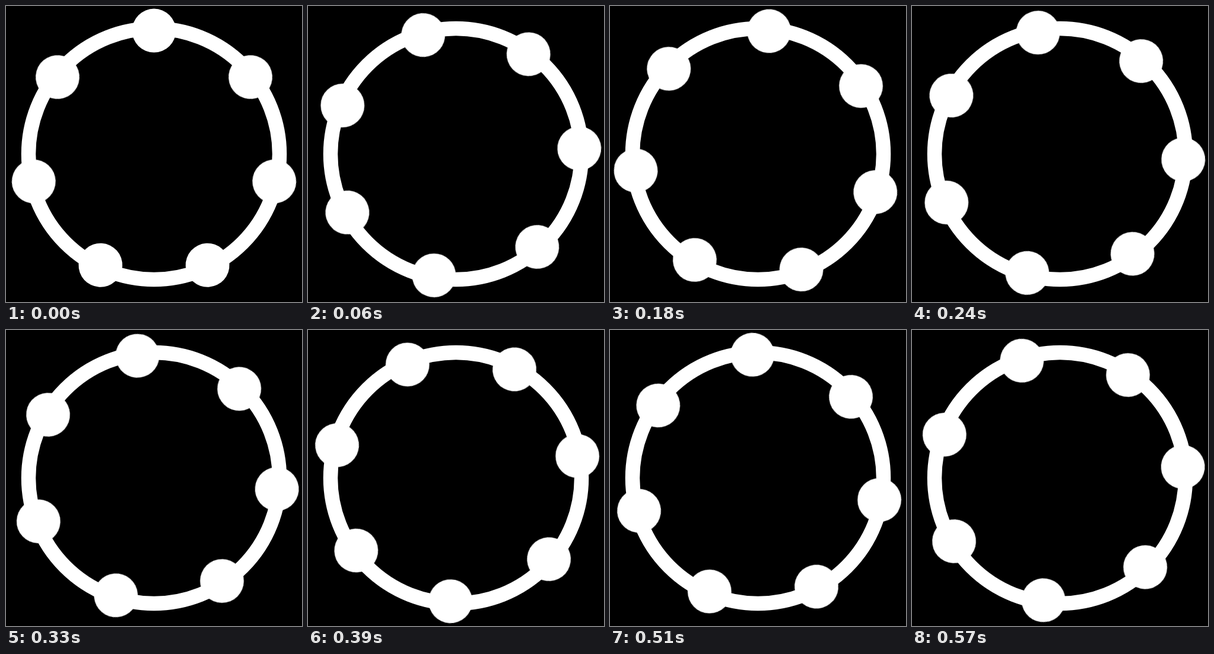
Recreate the animation shown at these times as an HTML page. Size 500 px wide and 500 px high, loop 0.6 s.

```html
<!DOCTYPE html>
<html lang="en">
<head>
<meta charset="utf-8">
<title>Spinning beaded ring</title>
<style>
  html, body { margin: 0; width: 100%; height: 100%; overflow: hidden; background: #000; }
  svg { display: block; width: 100vw; height: 100vh; }
  .ring { fill: none; stroke: #fff; stroke-width: 24.5; }
  .beads { fill: #fff; animation: spin 600ms steps(20, end) infinite; }
  @keyframes spin { to { transform: rotate(360deg); } }
</style>
</head>
<body>
<svg viewBox="-250 -250 500 500">
  <defs><circle id="bead" cy="-208.4" r="37"/></defs>
  <circle class="ring" r="212"/>
  <g class="beads">
    <use href="#bead"/>
    <use href="#bead" transform="rotate(51.4286)"/>
    <use href="#bead" transform="rotate(102.8571)"/>
    <use href="#bead" transform="rotate(154.2857)"/>
    <use href="#bead" transform="rotate(205.7143)"/>
    <use href="#bead" transform="rotate(257.1429)"/>
    <use href="#bead" transform="rotate(308.5714)"/>
  </g>
</svg>
</body>
</html>
```
